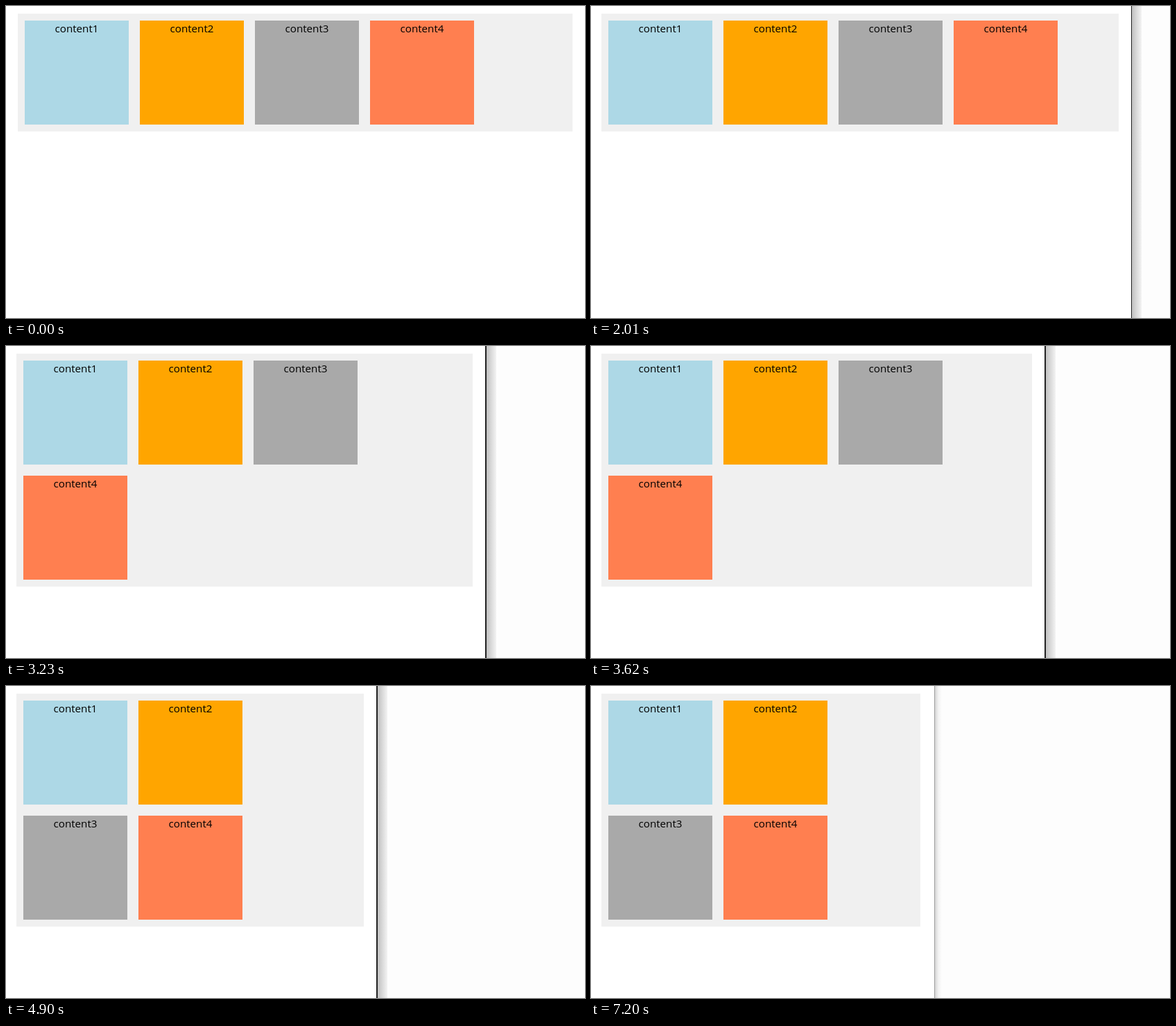
Recreate the animation shown at these times as an HTML page. Size 835 by 450 pixels, loop 7.3 s.

```html
<!DOCTYPE html>
<html lang="en">
<head>
<meta charset="utf-8">
<title>Flex wrap on resize</title>
<style>
  html, body { margin: 0; width: 100%; height: 100%; overflow: hidden; background: #fff; }
  #panel {
    position: absolute; top: 11px; box-sizing: border-box; padding: 2px;
    display: flex; flex-wrap: wrap; background: #f0f0f0;
  }
  #panel div {
    flex: none; width: 150px; height: 150px; margin: 8px; text-align: center;
    font: 15.2px/22px "Open Sans", "Noto Sans", sans-serif; color: #000;
  }
  #edge {
    position: absolute; top: 0; bottom: 0; right: 0; border-left: 1px solid #222;
    background: linear-gradient(90deg, #c0c0c0, #dadada 7px, #f3f3f3 14px, #fdfdfd 14px);
  }
  #edge.rest {
    border-color: #a0a0a0;
    background: linear-gradient(90deg, #d4d4d4, #f2f2f2 5px, #fdfdfd 10px);
  }
</style>
</head>
<body>
<div id="panel">
  <div style="background:lightblue">content1</div>
  <div style="background:orange">content2</div>
  <div style="background:darkgray">content3</div>
  <div style="background:coral">content4</div>
</div>
<div id="edge"></div>
<script>
const LOOP = 7300, START = 940, REST = 7200;
// drag path of the window edge: [tick, x]
const path = [[0, 820], [3, 816], [8, 779], [13, 733], [16, 703],
              [20, 654], [26, 566], [29, 534], [33, 495]];
const panel = document.getElementById("panel");
const edge = document.getElementById("edge");

// ticks grow slowly longer: tick n begins at START + 129n + n²/4
function tickAt(t) {
  return Math.floor(Math.sqrt(258 ** 2 + 4 * (t - START)) - 258);
}

function edgeAt(tick) {
  const i = path.findIndex(p => p[0] >= tick);
  if (i < 0) return path.at(-1)[1];
  if (i === 0) return path[0][1];
  const [n0, x0] = path[i - 1], [n1, x1] = path[i];
  return Math.round(x0 + (x1 - x0) * (tick - n0) / (n1 - n0));
}

function place(left, right) {
  panel.style.left = left + "px";
  panel.style.width = right - left + "px";
}

function draw() {
  const t = performance.now() % LOOP;
  const moved = t >= START, rest = t >= REST;
  edge.hidden = !moved;
  if (moved) {
    const tick = Math.min(tickAt(t), path.at(-1)[0]);
    const x = edgeAt(tick);
    const fast = edgeAt(tick - 1) - x > 10;
    place(15, x - (rest ? 20 : 18));
    edge.style.left = x + "px";
    edge.style.borderLeftWidth = fast ? "2px" : "1px";
    edge.classList.toggle("rest", rest);
  } else {
    place(17, 817);
  }
  requestAnimationFrame(draw);
}
draw();
</script>
</body>
</html>
```
